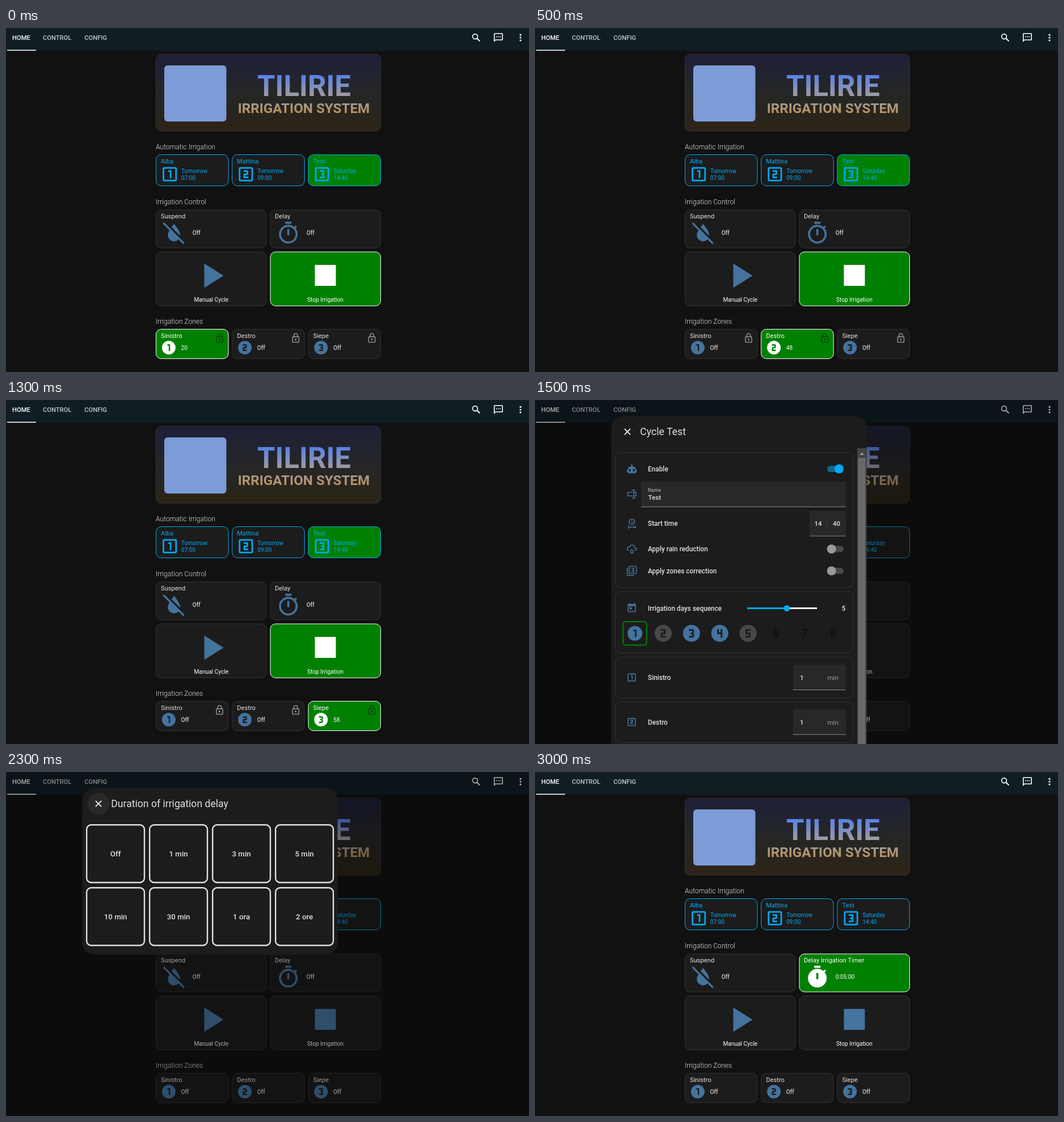
Recreate the animation shown at these times as an HTML page with a canvas. Size 922x607 px, loop 3500 ms.

```html
<!DOCTYPE html>
<html lang="en">
<head>
<meta charset="utf-8">
<title>Irrigation dashboard</title>
<style>
html, body { margin: 0; width: 100%; height: 100%; overflow: hidden; background: #111; }
canvas { display: block; }
</style>
</head>
<body>
<canvas id="stage" width="922" height="607"></canvas>
<script>
const ctx = document.getElementById('stage').getContext('2d');
const STEP = 500, SCENES = 7;
const INK = '#e1e1e1', WHITE = '#fff', BLUE = '#03a9f4', STEEL = '#44739e';
const GREEN = '#008000', CARD = '#1c1c1c', EDGE = '#333', GREY = '#9b9b9b';

// Icon outlines on a 24-unit grid
const DIGITS = [
  'M10 7V9H12V17H14V7Z',
  'M9 7V9H13V11H11A2 2 0 0 0 9 13V17H15V15H11V13H13A2 2 0 0 0 15 11V9A2 2 0 0 0 13 7Z',
  'M15 15V13.5A1.5 1.5 0 0 0 13.5 12A1.5 1.5 0 0 0 15 10.5V9A2 2 0 0 0 13 7H9V9H13V11H11V13H13V15H9V17H13A2 2 0 0 0 15 15',
  'M9 7V13H13V17H15V7H13V11H11V7Z',
  'M9 7V13H13V15H9V17H13A2 2 0 0 0 15 15V13A2 2 0 0 0 13 11H11V9H15V7Z',
  'M11 7A2 2 0 0 0 9 9V15A2 2 0 0 0 11 17H13A2 2 0 0 0 15 15V13A2 2 0 0 0 13 11H11V9H15V7ZM11 13H13V15H11Z',
  'M11 17L15 9V7H9V9H13L9 17Z',
  'M11 13H13V15H11ZM11 9H13V11H11ZM11 17H13A2 2 0 0 0 15 15V13.5A1.5 1.5 0 0 0 13.5 12A1.5 1.5 0 0 0 15 10.5V9A2 2 0 0 0 13 7H11A2 2 0 0 0 9 9V10.5A1.5 1.5 0 0 0 10.5 12A1.5 1.5 0 0 0 9 13.5V15A2 2 0 0 0 11 17Z'
];
const BOX = 'M3 5A2 2 0 0 1 5 3H19A2 2 0 0 1 21 5V19A2 2 0 0 1 19 21H5A2 2 0 0 1 3 19ZM5 5V19H19V5Z';
const STACK = 'M21 17V3H7V17ZM21 1A2 2 0 0 1 23 3V17A2 2 0 0 1 21 19H7A2 2 0 0 1 5 17V3A2 2 0 0 1 7 1ZM3 5V21H17V23H3A2 2 0 0 1 1 21V5Z';
const CHAT = 'M20 2H4A2 2 0 0 0 2 4V22L6 18H20A2 2 0 0 0 22 16V4A2 2 0 0 0 20 2M20 16H5.2L4 17.2V4H20ZM7 9H9V11H7ZM11 9H13V11H11ZM15 9H17V11H15Z';
const DROP_OFF = 'M20.84 22.73L16.29 18.18C15.2 19.3 13.7 20 12 20C8.7 20 6 17.3 6 14C6 12.7 6.7 11 7.55 9.44L1.11 3L2.39 1.73L22.11 21.46ZM18 14C18 10 12 3.25 12 3.25S10.84 4.55 9.55 6.35L17.95 14.75Z';
const LOCK = 'M18 8A2 2 0 0 1 20 10V20A2 2 0 0 1 18 22H6A2 2 0 0 1 4 20V10A2 2 0 0 1 6 8H7V6A5 5 0 0 1 17 6V8ZM18 20V10H6V20ZM15 8V6A3 3 0 0 0 9 6V8ZM10 15A2 2 0 0 0 14 15A2 2 0 0 0 10 15Z';
const ROBOT = 'M12 2A2 2 0 0 1 13 5.73V7H14A7 7 0 0 1 21 14H22A1 1 0 0 1 23 15V18A1 1 0 0 1 22 19H21V20A2 2 0 0 1 19 22H5A2 2 0 0 1 3 20V19H2A1 1 0 0 1 1 18V15A1 1 0 0 1 2 14H3A7 7 0 0 1 10 7H11V5.73A2 2 0 0 1 12 2M5 15.5A2.5 2.5 0 0 0 10 15.5A2.5 2.5 0 0 0 5 15.5M14 15.5A2.5 2.5 0 0 0 19 15.5A2.5 2.5 0 0 0 14 15.5';
const TEXTBOX = 'M17 7H22V17H17V19A1 1 0 0 0 18 20H20V22H17.5L16 21.2L14.5 22H12V20H14A1 1 0 0 0 15 19V5A1 1 0 0 0 14 4H12V2H14.5L16 2.8L17.5 2H20V4H18A1 1 0 0 0 17 5ZM2 7H13V9H4V15H13V17H2ZM20 15V9H17V15Z';
const CLOCK = 'M5 8A7 7 0 0 1 19 8A7 7 0 0 1 5 8M7.1 8A4.9 4.9 0 0 0 16.9 8A4.9 4.9 0 0 0 7.1 8M11 5V8.7L14.2 10.5L14.9 9.2L12.5 7.8V5ZM4 16V24H6V21H18V24L22 20L18 16V19H6V16Z';
const CLOUD = 'M6 15A4 4 0 1 1 7.8 7.4A5 5 0 0 1 18 9H19A3 3 0 0 1 19 15H18';
const RAINDROP = 'M12 12.6C10 15 9 16.7 9 18A3 3 0 0 0 15 18C15 16.7 14 15 12 12.6Z';
const CALENDAR = 'M7 10H12V15H7ZM19 19V8H5V19ZM19 3H18V1H16V3H8V1H6V3H5A2 2 0 0 0 3 5V19A2 2 0 0 0 5 21H19A2 2 0 0 0 21 19V5A2 2 0 0 0 19 3Z';

function icon(path, x, y, scale, color, lineWidth) {
  ctx.save();
  ctx.translate(x - 12 * scale, y - 12 * scale);
  ctx.scale(scale, scale);
  if (lineWidth) {
    ctx.strokeStyle = color;
    ctx.lineWidth = lineWidth;
    ctx.stroke(new Path2D(path));
  } else {
    ctx.fillStyle = color;
    ctx.fill(new Path2D(path), 'evenodd');
  }
  ctx.restore();
}

function text(str, x, middle, size, color = INK, weight = 400, align = 'left') {
  ctx.font = `${weight} ${size}px Roboto, sans-serif`;
  ctx.textAlign = align;
  ctx.fillStyle = color;
  ctx.fillText(str, x, middle + size * 0.355);
}

function rect(x, y, w, h, color) {
  ctx.fillStyle = color;
  ctx.fillRect(x, y, w, h);
}

function disc(x, y, r, color) {
  ctx.fillStyle = color;
  ctx.beginPath();
  ctx.arc(x, y, r, 0, Math.PI * 2);
  ctx.fill();
}

function line(points, color, width) {
  ctx.strokeStyle = color;
  ctx.lineWidth = width;
  ctx.beginPath();
  points.forEach(([x, y]) => ctx.lineTo(x, y));
  ctx.stroke();
}

function polygon(points, color) {
  ctx.fillStyle = color;
  ctx.beginPath();
  points.forEach(([x, y]) => ctx.lineTo(x, y));
  ctx.fill();
}

function panel(x, y, w, h, fill = CARD, edge = EDGE, radius = 9, lineWidth = 1) {
  ctx.beginPath();
  ctx.roundRect(x, y, w, h, radius);
  if (fill) { ctx.fillStyle = fill; ctx.fill(); }
  if (edge) { ctx.strokeStyle = edge; ctx.lineWidth = lineWidth; ctx.stroke(); }
}

function vertical(top, bottom, ...colors) {
  const g = ctx.createLinearGradient(0, top, 0, bottom);
  colors.forEach((c, i) => g.addColorStop(i / (colors.length - 1), c));
  return g;
}

function activePanel(x, y, w, h, active) {
  panel(x, y, w, h, active ? GREEN : CARD, active ? WHITE : EDGE);
}

function header() {
  rect(0, 0, 922, 40, '#101e24');
  text('HOME', 11, 17, 11.2, WHITE, 500);
  text('CONTROL', 65, 17, 11.2, '#c3c7c8', 500);
  text('CONFIG', 138.3, 17, 11.2, '#c3c7c8', 500);
  rect(2, 38.5, 51, 1.6, WHITE);
  ctx.strokeStyle = WHITE;
  ctx.lineWidth = 1.6;
  ctx.beginPath();
  ctx.arc(827, 15, 4.4, 0, Math.PI * 2);
  ctx.stroke();
  line([[830.2, 18.2], [835.4, 23.4]], WHITE, 2);
  icon(CHAT, 868, 17, 0.8, WHITE);
  [-4.8, 0, 4.8].forEach(dy => disc(907, 17 + dy, 1.6, WHITE));
}

function banner() {
  panel(264.5, 46.5, 396, 135.5, vertical(47, 182, '#1e2038', '#252627', '#2c2415'));
  panel(279, 66, 109.5, 99, '#7d9bd6', null, 6);
  text('TILIRIE', 525.5, 102, 51, vertical(82, 122, '#5580e8', '#a39c9c'), 700, 'center');
  text('IRRIGATION SYSTEM', 525, 141, 24.2, vertical(131, 151, '#a29a95', '#bb9058'), 700, 'center');
}

function cycles(testActive) {
  text('Automatic Irrigation', 264, 210, 12.1, INK, 300);
  [['Alba', 'Tomorrow', '07:00'], ['Mattina', 'Tomorrow', '09:00'], ['Test', 'Saturday', '14:40']]
    .forEach(([name, day, hour], i) => {
      const x = 264.5 + 134.2 * i;
      panel(x, 223.5, 127.5, 55, i === 2 && testActive ? GREEN : CARD, BLUE);
      text(name, x + 8.5, 235, 11.2, BLUE);
      icon(BOX + DIGITS[i], x + 24.2, 258, 1.39, BLUE);
      text(day, x + 44.5, 252.3, 10.1, BLUE);
      text(hour, x + 44.5, 264.5, 10.1, BLUE);
    });
}

function timerIcon(x, y, active) {
  const s = 1.83, color = active ? WHITE : STEEL;
  icon('M9 1H15V3H9ZM17.6 6L19.04 4.56L20.45 5.97L19 7.4Z', x, y, s, color);
  if (active) disc(x, y + s, 9 * s, color);
  else icon('M4 13A8 8 0 0 1 20 13A8 8 0 0 1 4 13Z', x, y, s, color, 2);
  icon('M11 8H13V14H11Z', x, y, s, active ? GREEN : color);
}

function controls({ running, suspended, delayed }) {
  text('Irrigation Control', 264, 307, 12.1, INK, 300);
  activePanel(264.5, 321, 194.5, 67, suspended);
  text(suspended ? 'Suspended For' : 'Suspend', 273, 332, 11.2, suspended ? WHITE : INK);
  icon(DROP_OFF, 296.3, 361.8, 1.83, suspended ? WHITE : STEEL);
  text(suspended || 'Off', 328.7, 361.5, 10.2, WHITE);

  activePanel(466, 321, 194.5, 67, delayed);
  text(delayed ? 'Delay Irrigation Timer' : 'Delay', 474, 332, 11.2, delayed ? WHITE : INK);
  timerIcon(497.7, 362, delayed);
  text(delayed || 'Off', 529.7, 361.5, 10.2, WHITE);

  panel(264.5, 395, 194.5, 95.3);
  polygon([[349.5, 415.5], [383.5, 437], [349.5, 458.5]], STEEL);
  text('Manual Cycle', 361.8, 479.7, 10.2, WHITE, 400, 'center');

  activePanel(466, 395, 194.5, 95.3, running);
  rect(544.5, 418, 37, 37, running ? WHITE : STEEL);
  text('Stop Irrigation', 563, 479.7, 10.2, WHITE, 400, 'center');
}

function zones({ running, zone, left }) {
  text('Irrigation Zones', 264, 517.5, 12.1, INK, 300);
  ['Sinistro', 'Destro', 'Siepe'].forEach((name, i) => {
    const x = 264.5 + 134.2 * i, active = zone === i;
    activePanel(x, 531.5, 127.5, 52, active);
    text(name, x + 8.5, 543, 11.2, active ? WHITE : INK);
    disc(x + 22.4, 564, 12, active ? WHITE : STEEL);
    icon(DIGITS[i], x + 22.4, 564, 1.2, active ? GREEN : CARD);
    text(active ? left : 'Off', x + 44, 564.7, 10.2, WHITE);
    if (running) icon(LOCK, x + 112, 547.3, 0.8, active ? '#0b4a0b' : '#8e8e8e');
  });
}

function dialog(title, height, closeFocused) {
  rect(0, 0, 922, 607, 'rgba(0,0,0,.32)');
  panel(134.5, 28, 450, height, CARD, null, 22.4);
  if (closeFocused) disc(163, 56, 19.5, '#292929');
  line([[157.9, 50.9], [168.1, 61.1]], WHITE, 1.6);
  line([[157.9, 61.1], [168.1, 50.9]], WHITE, 1.6);
  text(title, 185.3, 56, 17.6);
}

function field(x, y, w) {
  panel(x, y, w, 44, '#282828', null, [3, 3, 0, 0]);
  rect(x, y + 44, w, 1, '#8d8d8d');
}

function toggle(y, on) {
  panel(515, y - 5.6, 29, 11.2, on ? 'rgba(3,169,244,.54)' : '#484848', null, 5.6);
  disc(on ? 536 : 522.7, y, 8, on ? BLUE : '#999');
}

function label(str, y) {
  text(str, 199, y, 11.85, INK, 500);
}

function dayIcons() {
  const fills = [STEEL, '#484848', STEEL, STEEL, '#484848'];
  panel(155.3, 391, 41.5, 41.5, null, GREEN, 5, 2);
  DIGITS.forEach((digit, i) => {
    const x = 176.2 + 49.85 * i, scale = i ? 1.5 : 1.3;
    if (fills[i]) disc(x, 411.7, 10 * scale, fills[i]);
    icon(digit, x, 411.7, scale, fills[i] ? CARD : '#111');
  });
}

function cycleDialog() {
  dialog('Cycle Test', 640);
  [[92.5, 238.5], [338, 108.5], [454, 71.5], [532.5, 72]]
    .forEach(([y, h]) => panel(141.5, y, 419.5, h));

  icon(ROBOT, 170.7, 121.3, 0.8, STEEL);
  label('Enable', 121.5);
  toggle(121.5, true);

  icon(TEXTBOX, 170.7, 166, 0.8, STEEL);
  field(187, 144, 361);
  text('Name', 199, 158.5, 8.6, '#a0a0a0', 500);
  text('Test', 199.5, 172.3, 11.6, INK, 500);

  icon(CLOCK, 170.7, 218, 0.8, STEEL);
  label('Start time', 217.8);
  field(484, 195.5, 64);
  text('14', 499, 218, 11.6, INK, 500, 'center');
  text(':', 514.5, 217.5, 11.6, GREY, 400, 'center');
  text('40', 531.5, 218, 11.6, INK, 500, 'center');

  icon(CLOUD, 170.7, 263, 0.8, STEEL, 2);
  icon(RAINDROP, 170.7, 263, 0.8, STEEL, 2);
  label('Apply rain reduction', 263);
  toggle(263, false);

  icon(STACK, 170.7, 301.5, 0.8, STEEL);
  icon(DIGITS[2], 172.3, 299.9, 0.8, STEEL);
  label('Apply zones correction', 301.5);
  toggle(301.5, false);

  icon(CALENDAR, 170.7, 367, 0.8, STEEL);
  label('Irrigation days sequence', 367.5);
  rect(444, 366, 53, 3, WHITE);
  rect(374, 366, 70, 3, BLUE);
  disc(444, 367.5, 5.5, BLUE);
  text('5', 547.5, 367.5, 11.85, INK, 500, 'right');
  dayIcons();

  ['Sinistro', 'Destro'].forEach((name, i) => {
    const y = 489.5 + 78.8 * i;
    icon(BOX + DIGITS[i], 170.5, y, 0.8, STEEL);
    label(name, y + 0.3);
    field(455, y - 22.5, 93);
    text('1', 467, y + 0.3, 11.6, INK, 500);
    text('min', 535, y + 0.3, 11.8, GREY, 400, 'right');
  });

  rect(568, 85, 16.5, 522, '#424242');
  rect(569.5, 102, 13, 505, '#686868');
  polygon([[572, 97], [576.2, 92.5], [580.4, 97]], '#9a9a9a');
}

function delayDialog() {
  dialog('Duration of irrigation delay', 294.5, true);
  ['Off', '1 min', '3 min', '5 min', '10 min', '30 min', '1 ora', '2 ore'].forEach((name, i) => {
    const x = 142.2 + 111 * (i % 4), y = 93.2 + 111 * Math.floor(i / 4);
    panel(x, y, 101.8, 101.8, CARD, INK, 8, 2.4);
    text(name, x + 50.9, y + 51, 13.3, INK, 500, 'center');
  });
}

const states = [
  { running: true, zone: 0, left: '20' },
  { running: true, zone: 1, left: '48' },
  { running: true, zone: 2, left: '58' },
  { overlay: cycleDialog },
  { overlay: delayDialog },
  { suspended: '5:59:52' },
  { delayed: '0:05:00' }
];

function draw() {
  const state = states[Math.floor(performance.now() / STEP) % SCENES];
  rect(0, 0, 922, 607, '#111');
  header();
  banner();
  cycles(state.running);
  controls(state);
  zones(state);
  if (state.overlay) state.overlay();
  requestAnimationFrame(draw);
}
draw();
</script>
</body>
</html>
```
